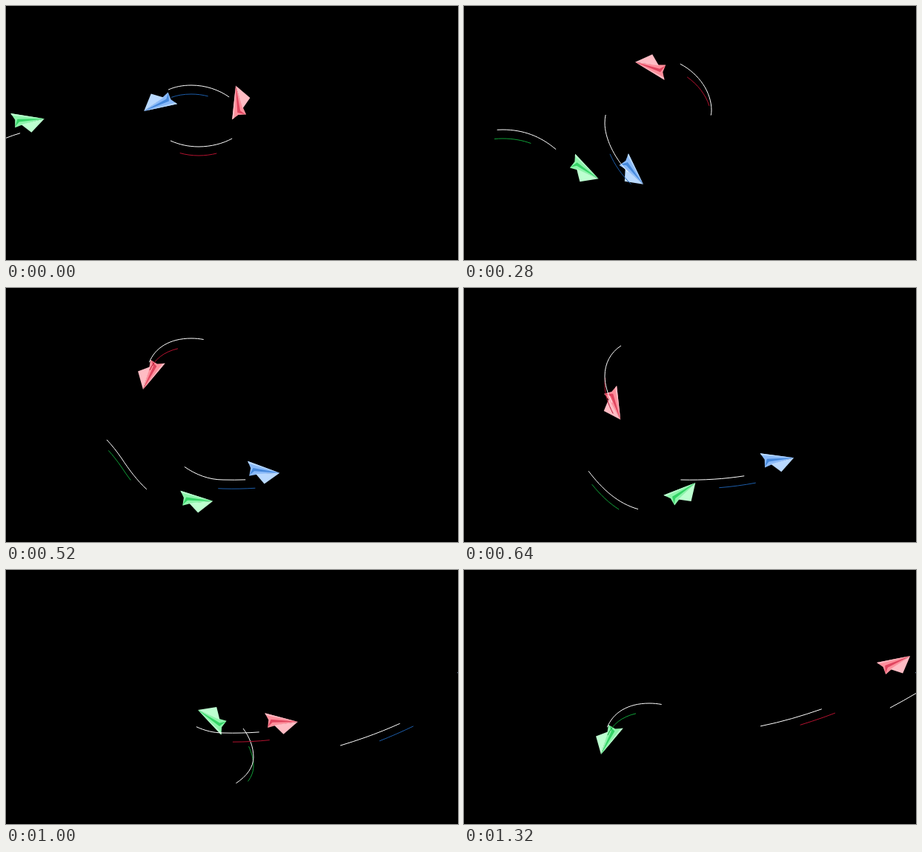
Write an HTML page with a canvas that moves like this. It is 610 px wide and 343 px high and loops after 1.36 s.

```html
<!DOCTYPE html>
<html lang="en">
<head>
<meta charset="utf-8">
<title>Paper planes</title>
<style>
  html, body { margin: 0; width: 100%; height: 100%; overflow: hidden; background: #000; }
  canvas { display: block; width: 610px; height: 343px; }
</style>
</head>
<body>
<canvas id="stage" width="610" height="343"></canvas>
<script>
const LOOP = 1360, STEP = 40;
const ctx = document.getElementById('stage').getContext('2d');

// Wake: down from the left, round to the far left of the loop, then out to the right
const intoLoop = 'M-60 98C-20 74 15 55 52 55C95 55 127 76 156 118C182 158 214 190 260 190'
  + 'C300 190 334 166 334 141C334 105 298 68 250 68C212 68 190 90 190 119';
const outOfLoop = 'C190 158 236 220 293 220C368 222 428 207 485 187C550 164 615 128 680 82';
const wake = new Path2D(intoLoop + outOfLoop);
const crest = pathLength(intoLoop);

// Key poses of a flight, evenly spaced in time: x, y, heading in degrees
const POSE_START = -800, POSE_GAP = 200;
const poses = [
  [29, 37, 8], [131.7, 68.5, 40], [211, 159.5, 43], [282, 164, -8],
  [308, 130.5, -85], [275, 93.5, -134], [215.5, 91, -178], [201.5, 143, -265],
  [263.3, 200, -313], [371.5, 199.5, -346], [502.5, 159.5, -362], [631, 93, -379]
];

// All planes fly the same course, apart in time and height
const planes = [
  { lag: 800, dy: 112, light: '#bdffd0', mid: '#8cf5ab', dark: '#35d467', line: '#10a038' },
  { lag: -440, dy: 39, light: '#b9d9ff', mid: '#8abaf9', dark: '#4689dc', line: '#1c5ca8' },
  { lag: 0, dy: 0, light: '#ffbcc4', mid: '#ff8f9c', dark: '#e0455f', line: '#b3122f' }
];

function pathLength(d) {
  const path = document.createElementNS('http://www.w3.org/2000/svg', 'path');
  path.setAttribute('d', d);
  return path.getTotalLength();
}

// Catmull-Rom through the key poses
function poseAt(s) {
  const last = poses.length - 1;
  const f = Math.min(Math.max((s - POSE_START) / POSE_GAP, 0), last);
  const i = Math.min(Math.floor(f), last - 1), u = f - i, v = 1 - u;
  return poses[i].map((a, c) => {
    const b = poses[i + 1][c], chord = b - a;
    const m0 = i > 0 ? (b - poses[i - 1][c]) / 2 : chord;
    const m1 = i + 2 <= last ? (poses[i + 2][c] - a) / 2 : chord;
    return a + chord * u + u * v * (v * (m0 - chord) - u * (m1 - chord));
  });
}

function poly(color, ...pts) {
  ctx.beginPath();
  for (const [x, y] of pts) ctx.lineTo(x, y);
  ctx.closePath();
  ctx.fillStyle = color;
  ctx.fill();
}

function drawPlane(p, s) {
  const [x, y, heading] = poseAt(s);
  ctx.save();
  ctx.translate(x, y + p.dy);
  ctx.rotate(heading * Math.PI / 180);
  poly(p.mid, [23, 0], [-23, -0.8], [-16, 7], [-14.5, 17.5], [-5, 12]);
  poly(p.light, [23, 0], [8.3, 20.8], [-7, 12]);
  poly(p.light, [23, 0], [-23, -0.8], [-21, 1.6]);
  poly(p.dark, [23, 0], [-13, 5.5], [-14.5, 16], [-10, 9]);
  ctx.restore();
}

function trail(head, length, dy, color) {
  ctx.save();
  ctx.translate(0, dy);
  ctx.setLineDash([length, 5000]);
  ctx.lineDashOffset = length - head;
  ctx.strokeStyle = color;
  ctx.stroke(wake);
  ctx.restore();
}

function draw(t) {
  ctx.fillStyle = '#000';
  ctx.fillRect(0, 0, 610, 343);
  for (const p of planes) {
    const s = t - p.lag;
    const head = crest + 1040 * Math.sin((s - 562) / 2210);
    const lead = 33 * Math.sin((s - 230) / 800) - 13;
    drawPlane(p, s);
    trail(head + lead, 50, p.dy + 12, p.line);
    trail(head, 86, p.dy, '#fff');
  }
}

function tick(now) {
  draw(Math.floor((now % LOOP) / STEP) * STEP);
  requestAnimationFrame(tick);
}
draw(0);
requestAnimationFrame(tick);
</script>
</body>
</html>
```
